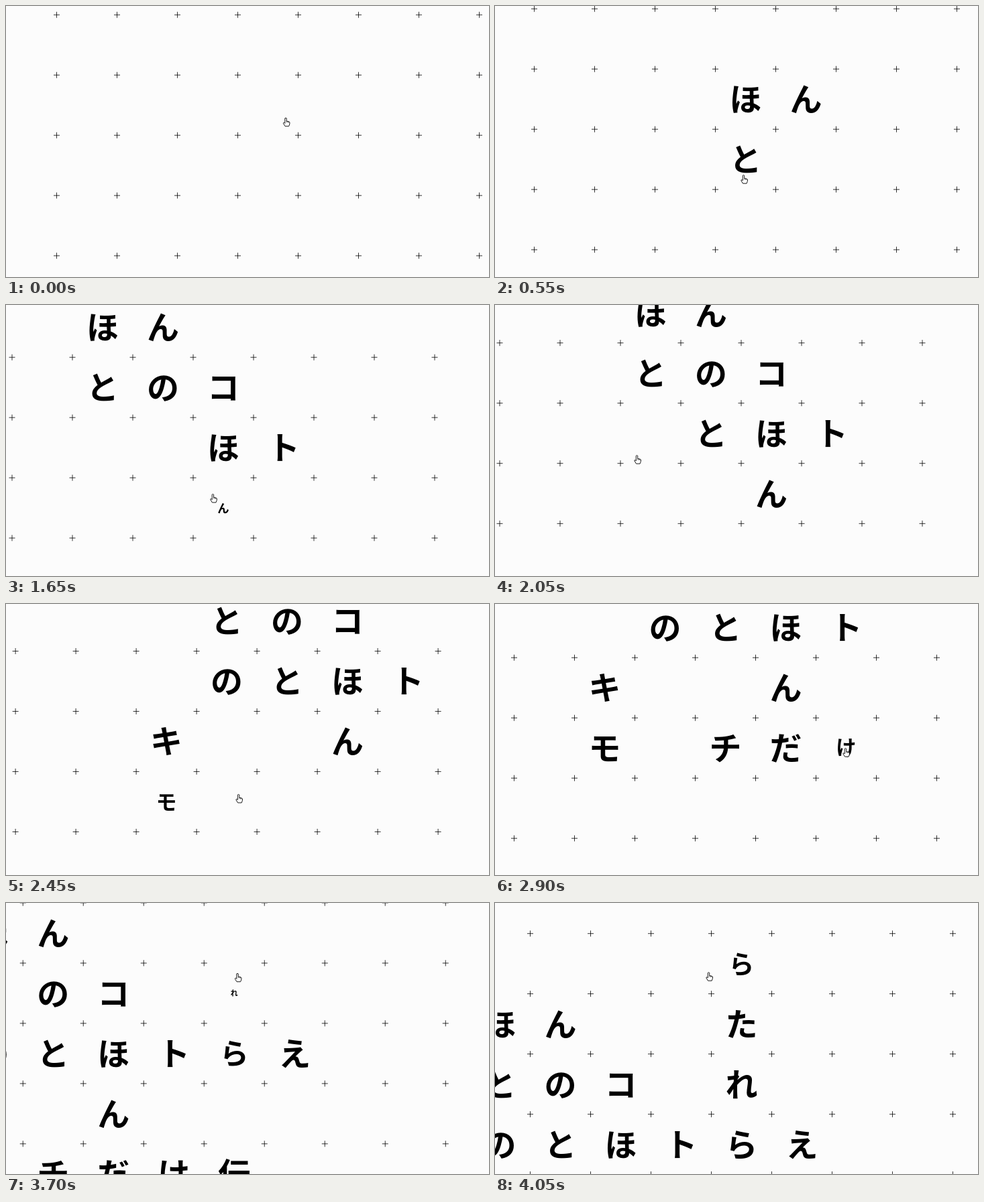
An HTML page with a canvas for the animation above (4.1 s loop, 720x405 px).

```html
<!DOCTYPE html>
<html lang="ja">
<head>
<meta charset="utf-8">
<style>
html, body { margin: 0; width: 720px; height: 405px; overflow: hidden; background: #fcfcfc; }
canvas { display: block; }
</style>
</head>
<body>
<canvas width="720" height="405"></canvas>
<script>
const ctx = document.querySelector('canvas').getContext('2d');
const LOOP = 4100, STEP = 50, CELL = 90, SIZE = 48, GROW = 250;

// time, x, y of the grid origin
const camera = [
  [50, 345.5, 103], [550, 328.5, 94], [600, 321, 83], [700, 302, 73],
  [1150, 172, 53], [1250, 139.5, 43], [1450, 104, 18], [1650, 99, -12],
  [1850, 126, -25], [2000, 170, -31], [2050, 187, -33.5], [2350, 268, -85],
  [2550, 285, -134], [2900, 208.5, -190], [3350, 23, -139.5],
  [3600, -52, -45], [3800, -66, 44], [4050, -37.5, 135.5]
];

// time, x, y of the pointer tip
const pointer = [
  [50, 417, 167], [200, 446, 158], [300, 412, 210], [550, 370.5, 252.5],
  [700, 405, 222], [850, 465, 200], [1100, 480, 226], [1250, 481.5, 235.5],
  [1400, 355, 240], [1600, 322, 290], [1800, 262, 235], [2050, 211.5, 224.5],
  [2200, 205, 255], [2350, 238, 300], [2500, 400, 272], [2650, 490, 240],
  [2900, 522.5, 215.5], [3050, 535, 198], [3350, 510.5, 134.5],
  [3550, 385, 136], [3700, 345, 105], [3900, 333, 80], [4050, 318.5, 103.5]
];

const text = 'ほんとのコトほんとのキモチだけ伝えられたら';
const births = [
  100, 200, 300, 700, 850, 1189, 1400, 1600, 1790, 2050, 2200,
  2350, 2500, 2650, 2802, 3050, 3400, 3530, 3670, 3790, 3915
];

const hand = new Path2D('M-1.2 .8Q0 -.4 1.2 .8V5L4.8 5.8Q6 6.2 6 7.5Q6 10 4.6 12.7H-1L-3.6 8.4Q-3.6 7 -2.4 7.2L-1.2 8.4Z');
const fingers = new Path2D('M1.2 5V7M2.9 5.4V7.4M4.5 5.8V7.6');

function slope(keys, i, k) {
  const a = keys[Math.max(i - 1, 0)], b = keys[Math.min(i + 1, keys.length - 1)];
  return i ? (b[k] - a[k]) / (b[0] - a[0]) : 0;
}

// cubic Hermite through the keys
function sample(keys, t) {
  t = Math.max(t, keys[0][0]);
  let i = 0;
  while (i < keys.length - 2 && t > keys[i + 1][0]) i++;
  const a = keys[i], b = keys[i + 1], d = b[0] - a[0], u = (t - a[0]) / d, v = 1 - u;
  return [1, 2].map(k => v * v * (1 + 2 * u) * a[k] + u * u * (3 - 2 * u) * b[k]
    + d * u * v * (v * slope(keys, i, k) - u * slope(keys, i + 1, k)));
}

// each letter is born in the cell under the pointer
const letters = births.map((birth, i) => {
  const [x, y] = sample(camera, birth), [px, py] = sample(pointer, birth);
  return { glyph: text[i], birth, col: Math.floor((px - x) / CELL), row: Math.floor((py - y) / CELL) };
});

function drawGrid(x0, y0) {
  const first = p => (p % CELL + CELL) % CELL - CELL;
  ctx.lineWidth = 0.8;
  ctx.beginPath();
  for (let x = first(x0); x < 730; x += CELL)
    for (let y = first(y0) + 0.2; y < 415; y += CELL) {
      ctx.moveTo(x - 4.5, y);
      ctx.lineTo(x + 4.5, y);
      ctx.moveTo(x, y - 4.5);
      ctx.lineTo(x, y + 4.5);
    }
  ctx.stroke();
}

function drawLetter(glyph, x, y, age) {
  const rest = 1 - Math.min(age / GROW, 1), scale = 1 - rest * rest;
  ctx.save();
  ctx.translate(x, y);
  ctx.scale(scale, scale);
  ctx.fillText(glyph, 0, SIZE * 0.38);
  ctx.restore();
}

function drawPointer(x, y) {
  ctx.save();
  ctx.translate(x, y);
  ctx.fillStyle = '#fff';
  ctx.fill(hand);
  ctx.lineWidth = 0.9;
  ctx.stroke(hand);
  ctx.lineWidth = 0.6;
  ctx.stroke(fingers);
  ctx.restore();
}

function frame(now) {
  let t = Math.floor(now % LOOP / STEP) * STEP;
  if (t < 100) t = 0;
  const [x, y] = sample(camera, t);
  ctx.fillStyle = '#fcfcfc';
  ctx.fillRect(0, 0, 720, 405);
  ctx.fillStyle = ctx.strokeStyle = '#000';
  drawGrid(x, y);
  ctx.font = `700 ${SIZE}px "Noto Sans CJK JP", "Noto Sans CJK", sans-serif`;
  ctx.textAlign = 'center';
  for (const { glyph, birth, col, row } of letters)
    if (t > birth) drawLetter(glyph, x + (col + 0.5) * CELL, y + (row + 0.5) * CELL, t - birth);
  drawPointer(...sample(pointer, t));
  requestAnimationFrame(frame);
}
requestAnimationFrame(frame);
</script>
</body>
</html>
```
